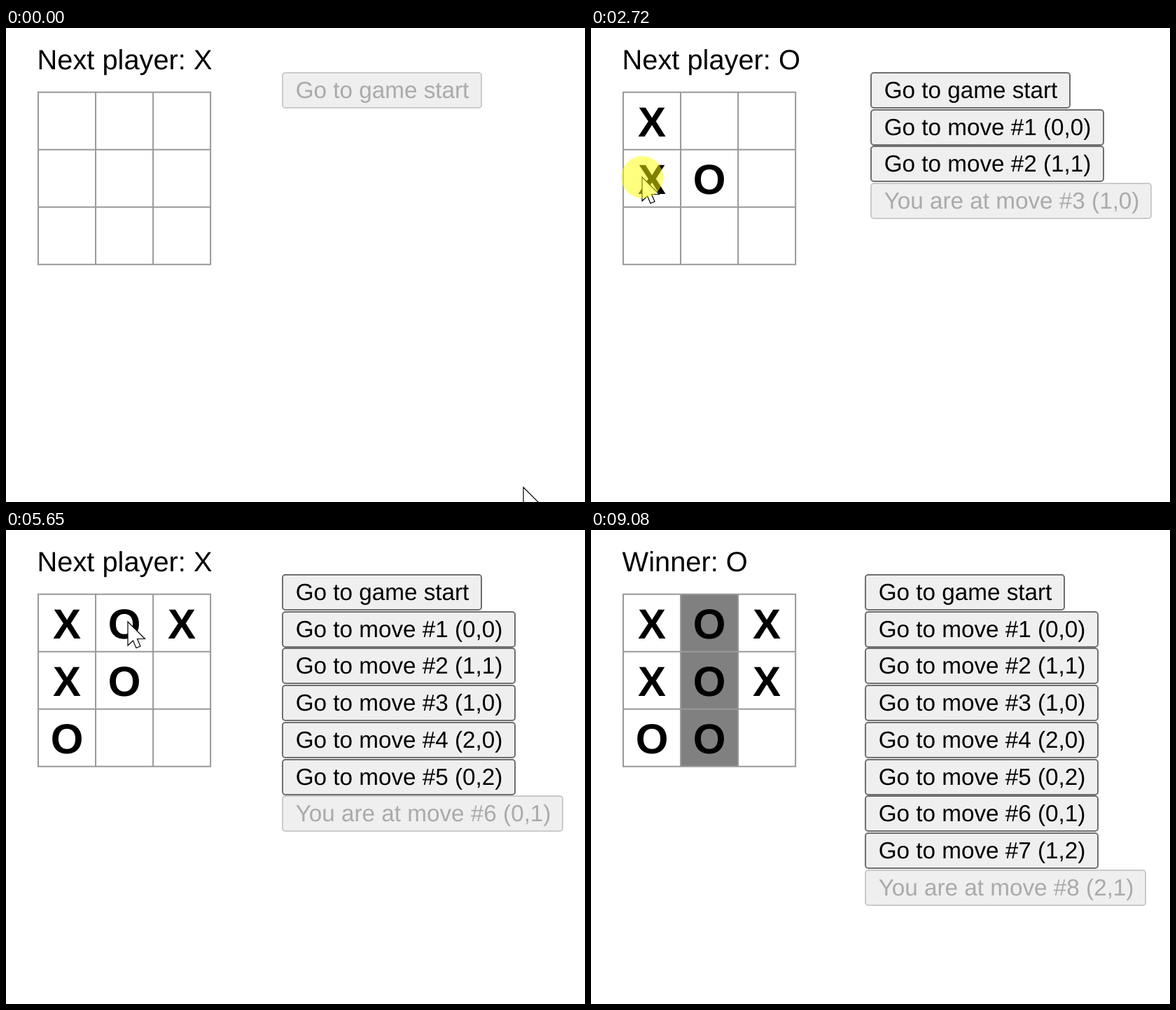
An HTML page that plays this animation: 827 px wide and 677 px high, repeating every 9570 ms.

```html
<!DOCTYPE html>
<html lang="en">
<head>
<meta charset="utf-8">
<title>Tic-tac-toe</title>
<style>
  html, body { margin: 0; width: 100%; height: 100%; overflow: hidden; background: #fff; }
  svg { display: block; font-family: "Liberation Sans", Arial, sans-serif; text-rendering: geometricPrecision; }
  .status { font-size: 39.8px; }
  .mark { font-size: 60px; font-weight: bold; text-anchor: middle; }
  .grid { fill: none; stroke: #999; stroke-width: 2; }
  .button { font-size: 33.25px; }
  .button rect { fill: #efefef; stroke: #6f6f6f; stroke-width: 2; }
  .disabled { fill: #aaa; }
  .disabled rect { stroke: #cbcbcb; }
  .cursor { fill: #fff; stroke: #000; stroke-width: 1.2; }
  .click { fill: #ff0; fill-opacity: .5; }
</style>
</head>
<body>
<svg width="827" height="677" viewBox="0 0 827 677">
  <g id="game"></g>
  <path id="cursor" class="cursor" d="M0 0V34L7.5 27L12 37.5L18 35L13.5 24.5H24.5Z"/>
  <circle id="click" class="click" r="30"/>
</svg>
<script>
const LOOP = 9570, STEP = 68;
const PLACE_DELAY = 70, CLICK_LENGTH = 130;
const BOARD = { x: 46, y: 91.7, cell: 82.05 };
const START = { x: 739, y: 656 };

// The cursor visits these points; a click marks the cell below it.
const visits = [
  { x: 98, y: 125, depart: 70, arrive: 680, click: 880 },
  { x: 166, y: 199, depart: 1020, arrive: 1430, click: 1760 },
  { x: 73, y: 213, depart: 1910, arrive: 2450, click: 2650 },
  { x: 71, y: 296, depart: 2980, arrive: 3460, click: 3530 },
  { x: 251, y: 142, depart: 3870, arrive: 4300, click: 4560 },
  { x: 174, y: 131, depart: 4700, arrive: 5250, click: 5520 },
  { x: 222, y: 274, depart: 5980, arrive: 6400 },
  { x: 234, y: 225, depart: 6400, arrive: 6680, click: 6830 },
  { x: 169, y: 292, depart: 6970, arrive: 7650, click: 7720 },
  { x: 290, y: 262, depart: 8380, arrive: 8650 },
  { x: 724, y: 690, depart: 8650, arrive: 9080 }
];
const turns = visits.filter(visit => visit.click).map(({ x, y, click }) => ({
  click,
  column: Math.floor((x - BOARD.x) / BOARD.cell),
  row: Math.floor((y - BOARD.y) / BOARD.cell)
}));

const byId = id => document.getElementById(id);
const text = (x, y, content, name = "") => `<text class="${name}" x="${x}" y="${y}">${content}</text>`;
const player = index => index % 2 ? "O" : "X";

function gridMarkup() {
  const { x, y, cell } = BOARD, size = 3 * cell;
  let path = "";
  for (let i = 0; i <= 3; i++) {
    path += `M${x + i * cell} ${y - 1}v${size + 2}M${x - 1} ${y + i * cell}h${size + 2}`;
  }
  return `<path class="grid" d="${path}"/>`;
}

function button(index, left, current) {
  const turn = turns[index - 1];
  const label = turn
    ? `${current ? "You are at" : "Go to"} move #${index} (${turn.row},${turn.column})`
    : "Go to game start";
  const width = turn ? (current ? 402 : 334) : 286;
  const top = Math.round(63 + index * 52.7);
  return `<g class="button ${current ? "disabled" : ""}">
    <rect x="${left + 1}" y="${top + 1}" width="${width - 2}" height="50" rx="4"/>
    ${text(left + 19.7, top + 37.4, label)}</g>`;
}

function gameMarkup(count) {
  const { x, y, cell } = BOARD;
  const won = count === turns.length;
  const next = player(count);
  const left = won ? 391 : next === "X" ? 394 : 399;
  let out = text(44.6, 58.8, won ? "Winner: O" : `Next player: ${next}`, "status");
  if (won) out += `<rect x="${x + cell}" y="${y}" width="${cell}" height="${3 * cell}" fill="#808080"/>`;
  out += gridMarkup();
  turns.slice(0, count).forEach(({ row, column }, i) => {
    out += text(x + (column + .5) * cell, y + row * cell + 63.2, player(i), "mark");
  });
  for (let i = 0; i <= count; i++) out += button(i, left, i === count);
  return out;
}

// Point on an arc between two points that sags slightly downwards.
function arc(from, to, s) {
  const dx = to.x - from.x, dy = to.y - from.y, length = Math.hypot(dx, dy);
  const sag = Math.min(50, length * .2) * Math.sign(dx) / length * 2 * s * (1 - s);
  return { x: from.x + dx * s - dy * sag, y: from.y + dy * s + dx * sag };
}

function cursorAt(time) {
  let from = START;
  for (const to of visits) {
    if (time < to.depart) break;
    if (time < to.arrive) {
      const share = (time - to.depart) / (to.arrive - to.depart);
      const steps = Math.round((to.arrive - to.depart) / STEP);
      const p = (Math.floor(share * steps) + 1) / (steps + 1);
      return arc(from, to, p * p * (3 - 2 * p));
    }
    from = to;
  }
  return from;
}

let shownCount = -1;
function draw(now) {
  const time = now % LOOP;
  const count = turns.filter(({ click }) => time >= click + PLACE_DELAY).length;
  if (count !== shownCount) {
    byId("game").innerHTML = gameMarkup(count);
    shownCount = count;
  }
  const { x, y } = cursorAt(time);
  const position = `translate(${Math.round(x)} ${Math.round(y)})`;
  const clicking = turns.some(({ click }) => time >= click && time < click + CLICK_LENGTH);
  byId("cursor").setAttribute("transform", position);
  byId("click").setAttribute("transform", position);
  byId("click").setAttribute("visibility", clicking ? "visible" : "hidden");
}

const startTime = performance.now();
function tick() {
  draw(performance.now() - startTime);
  requestAnimationFrame(tick);
}
tick();
</script>
</body>
</html>
```
